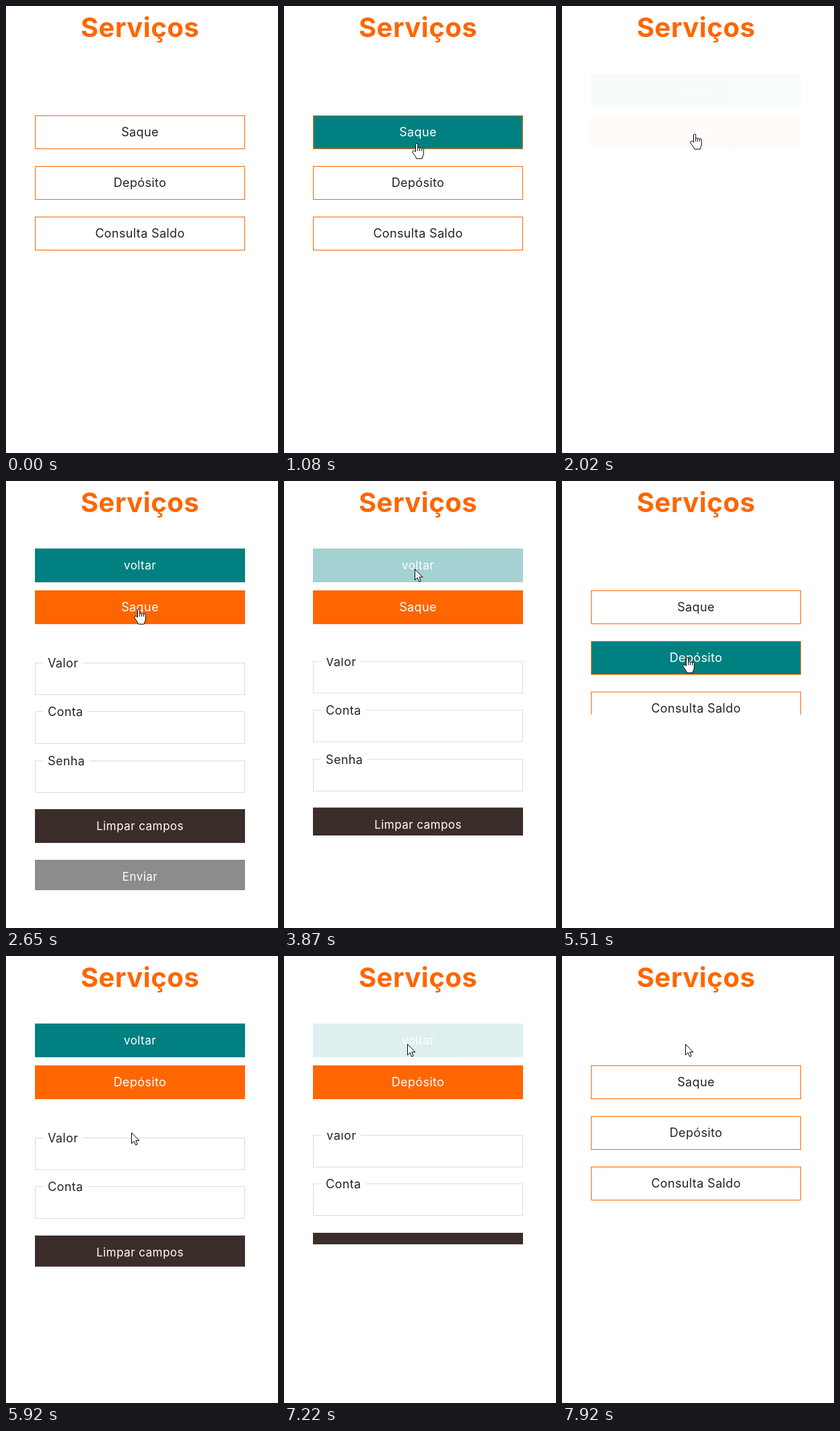
An HTML page for the animation above (7990 ms loop, 404x662 px).

```html
<!DOCTYPE html>
<html lang="pt">
<head>
<meta charset="utf-8">
<title>Serviços</title>
<style>
  html, body { margin: 0; width: 100%; height: 100%; overflow: hidden; background: #fff; }
  #stage { position: relative; width: 404px; height: 662px; overflow: hidden;
    font: 18px/48px Inter, Montserrat, sans-serif; letter-spacing: .35px; color: #212529; }
  #stage div, #stage svg { position: absolute; box-sizing: border-box; }
  h1 { position: absolute; top: 12px; left: 0; width: 398px; margin: 0; text-align: center;
    font-size: 40px; line-height: 40px; font-weight: 700; letter-spacing: .5px; color: #f60; }
  #menu, .form { left: 43px; width: 312px; overflow: hidden; }
  #menu { top: 162px; }
  .form { top: 262px; }
  .inner { left: 0; top: 0; width: 312px; height: 400px; }
  .item { left: 0; width: 312px; height: 50px; border: 1px solid #f60; text-align: center; }
  .item.on { background: teal; color: #fff; }
  .btn { left: 0; width: 312px; height: 50px; line-height: 50px; text-align: center; color: #fff;
    font-size: 17px; letter-spacing: .45px; }
  #back { left: 43px; top: 100px; background: teal; }
  #head { left: 43px; top: 162px; background: #f60; font-size: 18px; letter-spacing: .35px; }
  .field { left: 0; width: 312px; height: 48px; border: 1px solid #dcdcdc; }
  .field span { position: absolute; left: 11px; top: -9px; padding: 0 7px; line-height: 18px; background: #fff; }
  .clear { background: #3b2e2a; }
  .send { background: #8c8c8c; }
  #stage svg { left: 0; top: 0; overflow: visible; fill: #fff; stroke: #000; stroke-linejoin: round; }
</style>
</head>
<body>
<div id="stage">
  <h1>Serviços</h1>
  <div id="menu"></div>
  <div id="back" class="btn">voltar</div>
  <div id="head" class="btn"></div>
  <svg id="arrow" width="13" height="20"><path d="M.5.7v16l3.7-3.5 2.5 5.8 2.5-1.1-2.4-5.6h5z"/></svg>
  <svg id="hand" width="18" height="24">
    <path d="M5.5 13V2.2a1.6 1.6 0 0 1 3.2 0V7.6a1.5 1.5 0 0 1 2.9.4 1.5 1.5 0 0 1 2.9.7 1.4 1.4 0 0 1 2.8 1V15c0 4-1.7 4.5-2.1 8H6.6C6 19.5 1.7 16 .8 13.3.2 11.2 2.8 10.3 4.1 11.6z"/>
    <path fill="none" d="M8.7 7.5v4.3M11.6 8v3.8M14.5 9v2.8"/>
  </svg>
</div>
<script>
const LOOP = 7990;
const $ = id => document.getElementById(id);
const clamp = v => Math.max(0, Math.min(1, v));
const prog = (t, start, dur) => clamp((t - start) / dur);
const swing = (t, start, dur) => .5 - .5 * Math.cos(Math.PI * prog(t, start, dur));

function add(parent, cls, top, html) {
  const el = document.createElement('div');
  el.className = cls;
  el.style.top = top + 'px';
  el.innerHTML = html;
  parent.appendChild(el);
  return el;
}

const items = ['Saque', 'Depósito', 'Consulta Saldo'].map((s, i) => add($('menu'), 'item', 75 * i, s));

// One visit per opened service: click, form slide, click on "voltar"
const visits = [
  { title: 'Saque', fields: ['Valor', 'Conta', 'Senha'], height: 344, open: 1800, slide: 2100, dur: 540, close: 3690 },
  { title: 'Depósito', fields: ['Valor', 'Conta'], height: 277, open: 5475, slide: 5664, dur: 400, close: 6975 }
];
for (const v of visits) {
  v.box = document.createElement('div');
  v.box.className = 'form';
  $('stage').insertBefore(v.box, $('arrow'));
  v.inner = add(v.box, 'inner', 0, '');
  v.fields.forEach((s, i) => add(v.inner, 'field', 7 + Math.floor(72.5 * i), `<span>${s}</span>`));
  const end = 7 + Math.floor(72.5 * v.fields.length);
  add(v.inner, 'btn clear', end, 'Limpar campos');
  add(v.inner, 'btn send', end + 75, 'Enviar');
}

// Pointer path: time, x, y
const path = [
  [380, 290, 662], [450, 262, 613], [800, 200, 300], [1080, 197, 203], [1150, 197, 196],
  [1360, 197, 189], [3050, 197, 189], [3330, 194, 130], [4500, 194, 130], [4640, 192, 146],
  [4710, 190, 177], [4780, 190, 179], [5100, 188, 240], [5380, 186, 261], [6130, 186, 261],
  [6260, 185, 236], [6820, 183, 130], [LOOP, 183, 130]
];
function pointer(t) {
  const i = Math.max(1, path.findIndex(p => p[0] > t));
  const [a, b] = [path[i - 1], path[i]];
  const k = prog(t, a[0], b[0] - a[0]);
  return [a[1] + (b[1] - a[1]) * k, a[2] + (b[2] - a[2]) * k];
}

function place(el, x, y, show) {
  el.style.transform = `translate(${Math.round(x)}px,${Math.round(y)}px)`;
  el.style.visibility = show ? 'visible' : 'hidden';
}

function render(t) {
  let menu = 1, head = 0, back = 0, backActive = false;
  for (const v of visits) {
    const shut = swing(t, v.close, 560);
    const size = v.height * swing(t, v.slide, v.dur) * (1 - shut);
    v.box.style.height = size + 'px';
    v.inner.style.transform = `translateY(${-10 * shut}px)`;
    if (t < v.open || t > v.close + 945) continue;
    menu = 1 - swing(t, v.open, 200) + swing(t, v.close + 745, 200);
    const appear = swing(t, v.open + 200, 200);
    head = appear * (1 - swing(t, v.close + 545, 200));
    back = appear * (1 - prog(t, v.close, 280));
    backActive = t > v.open + 200 && t < v.close + 100;
    $('head').textContent = v.title;
  }
  $('menu').style.height = 200 * menu + 'px';
  $('head').style.opacity = head;
  $('back').style.opacity = back;

  const [x, y] = pointer(t), shown = t >= 380;
  let hand = backActive && y >= 100 && y < 150 || head > 0 && y >= 162 && y < 212;
  items.forEach((el, i) => {
    const top = 162 + 75 * i;
    const over = shown && y >= top && y < top + 50 && 162 + 200 * menu > y;
    el.classList.toggle('on', over);
    hand = hand || over;
  });
  place($('arrow'), x, y, shown && !hand);
  place($('hand'), x - 7, y, shown && hand);
}

function tick() {
  render(performance.now() % LOOP);
  requestAnimationFrame(tick);
}
tick();
</script>
</body>
</html>
```
